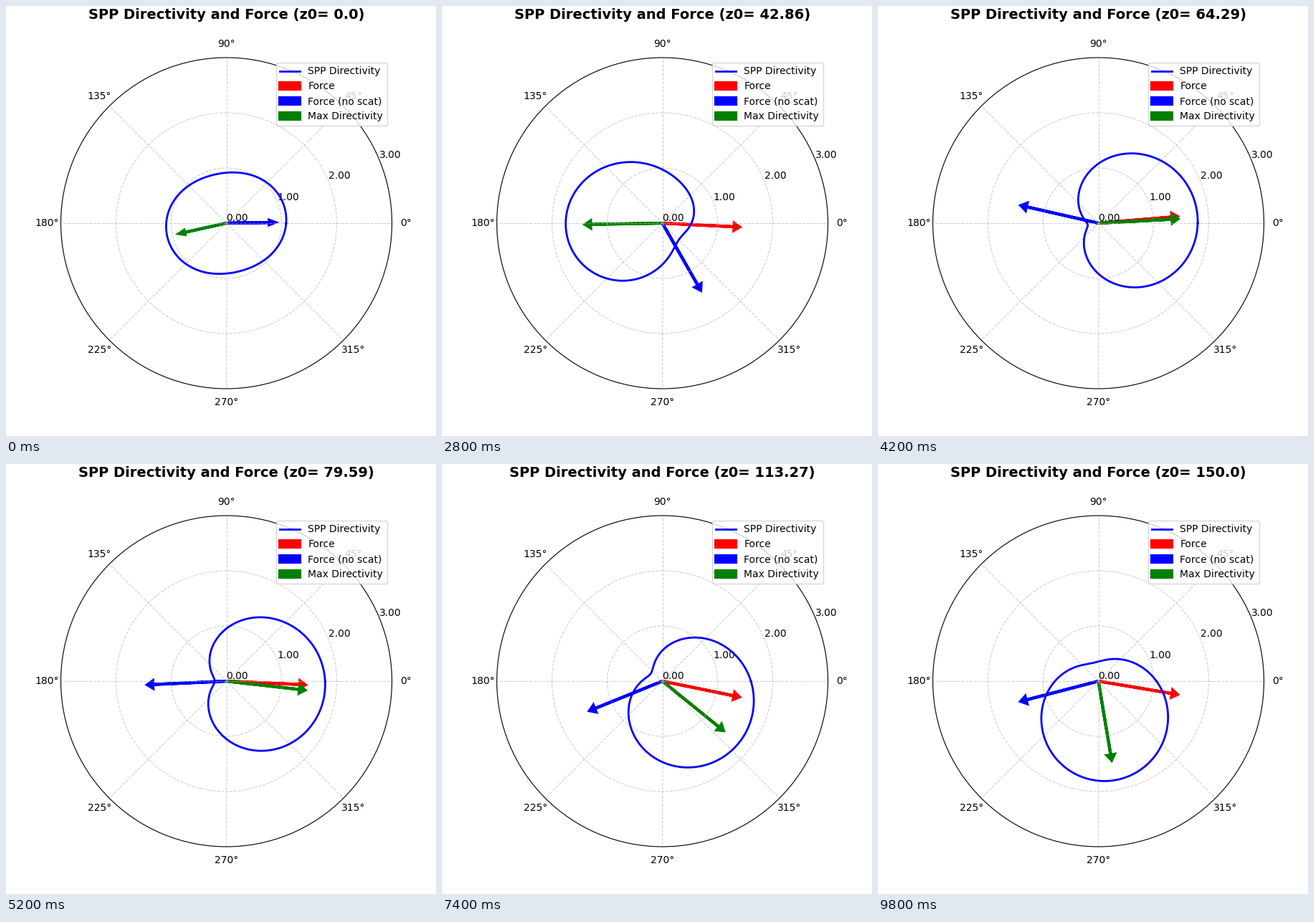
Animation of 600 by 600 pixels, one loop 10 s. Source, as a matplotlib script:

```python
import numpy as np
import matplotlib.pyplot as plt
from matplotlib.animation import FuncAnimation

FRAMES = 50
INTERVAL = 200
Z_MAX = 150
FLIP, TURN = 18, 14     # steps at which the pattern flips and starts to drift

theta = np.linspace(0, 2 * np.pi, 721)


def flipped(i):
    """Share of the flip that is done, 0 to 1."""
    return 1 / (1 + np.exp((FLIP - i) / .7))


def dipole(i):
    """Strength of the one-sided part: grows fast, saturates, fades a little."""
    return (.85 - .0023 * i) * np.tanh(np.exp(.39 * (i - TURN)))


def blend(i, early, late):
    s = flipped(i)
    return early * (1 - s) + late * s


def directivity(i):
    drift = .82 * max(i - TURN, 0) ** 1.35
    heading = np.radians(169 + 211 * flipped(i) - drift)
    oval = .095 * (1 + dipole(i))
    tilt = np.radians(25)
    cos2 = blend(i, oval * np.cos(tilt), -.08 * (max(i - 30, 0) / 19) ** 2)
    sin2 = blend(i, oval * np.sin(tilt), -.02)
    return (1 + dipole(i) * np.cos(theta - heading)
            + cos2 * np.cos(2 * theta) + sin2 * np.sin(2 * theta))


def force_angle(i):
    return blend(i, 1 + .25 * i - 12 * dipole(i),
                 .043 * (i - 41) ** 2 - 12.3)


def free_force_angle(i):
    return blend(i, 1.5 + 3.5 * i - 177 * dipole(i),
                 -157 - .104 * (i - 40) ** 2)


fig = plt.figure(figsize=(6, 6), dpi=100)
ax = fig.add_subplot(projection="polar")
curve, = ax.plot(theta, directivity(0), color="blue", lw=2,
                 label="SPP Directivity")


def add_arrow(color, label):
    return ax.arrow(0, 0, 0, 1, head_width=.1, head_length=.1, lw=3,
                    fc=color, ec=color, length_includes_head=True,
                    label=label)


arrows = [add_arrow("red", "Force"),
          add_arrow("blue", "Force (no scat)"),
          add_arrow("green", "Max Directivity")]

ax.set_ylim(0, 3)
ax.set_yticks([0, 1, 2, 3], ["0.00", "1.00", "2.00", "3.00"])
ax.grid(True, linestyle="--", alpha=.6)
ax.legend(loc="upper right")
title = ax.set_title("", fontsize=14, fontweight="bold", y=1.1, pad=5.4)


def update(i):
    d = directivity(i)
    curve.set_ydata(d)
    angles = (np.radians(force_angle(i)), np.radians(free_force_angle(i)),
              theta[d.argmax()])
    for arrow, angle in zip(arrows, angles):
        arrow.set_data(x=angle, y=0, dx=0, dy=.8 * d.max())
    z0 = round(Z_MAX * i / (FRAMES - 1), 2)
    title.set_text(f"SPP Directivity and Force (z0= {z0})")
    return [curve, title, *arrows]


anim = FuncAnimation(fig, update, frames=FRAMES, interval=INTERVAL,
                     init_func=lambda: update(0), repeat=True,
                     repeat_delay=0, blit=False)
plt.show()
```
